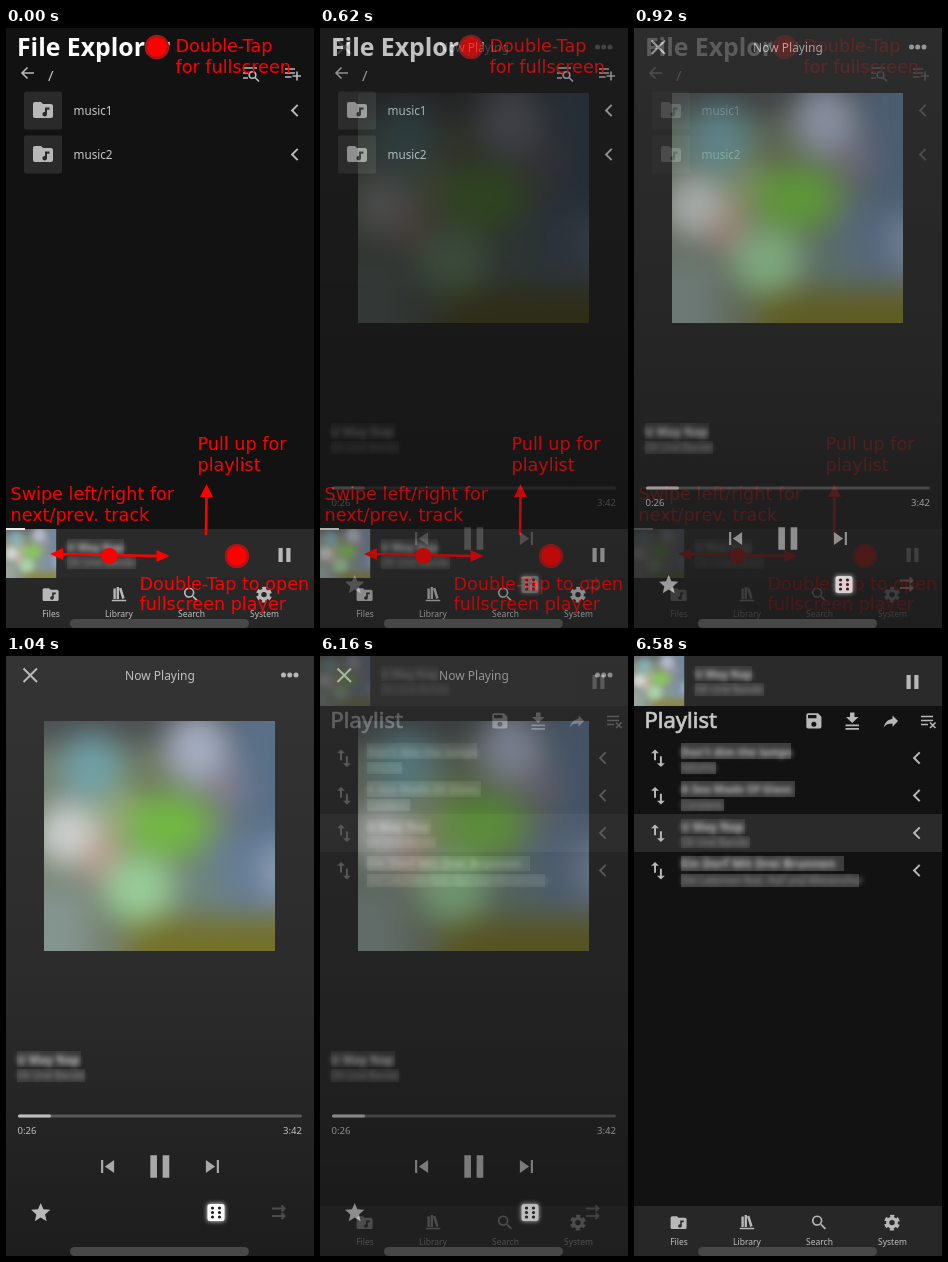
Write an HTML page that moves like this. It is 308 px wide and 600 px high and loops after 8000 ms.

```html
<!DOCTYPE html>
<html lang="en">
<head>
<meta charset="utf-8">
<title>Music player gestures</title>
<style>
  html, body { margin: 0; width: 100%; height: 100%; overflow: hidden; background: #121212; }
  svg { display: block; width: 100%; height: 100%; }
  text { font-family: "Noto Sans", "Open Sans", sans-serif; }
  .icon { fill: #b8b8b8; fill-rule: evenodd; }
  .line { fill: none; stroke: #b8b8b8; stroke-width: 2; }
  .nav text { font-size: 8.5px; fill: #c0c0c0; text-anchor: middle; }
  .time { font-size: 9.6px; fill: #c0c0c0; }
  .soft text { filter: blur(2.6px); }
  .soft .name { font-size: 12px; font-weight: bold; fill: #c0c0c0; }
  .soft .artist { font-size: 10px; fill: #a0a0a0; }
  .soft rect { fill: #fff; opacity: .08; }
  .soft.strong rect { opacity: .18; }
  .hint text { font: 17.6px "DejaVu Sans", sans-serif; fill: #f00; }
  .hint .tap { fill: #f00; stroke: #a81616; stroke-width: 2.5; }
  .hint .arm { fill: none; stroke: #f00; stroke-width: 2.6; }
  .hint .head, .hint .dot { fill: #f00; }

  /* Both fades advance in ten steps of 60 ms, the first one landing at once. */
  #player { animation: showPlayer 8s infinite; }
  #playlist { animation: showPlaylist 8s infinite; }
  @keyframes showPlayer {
    0%, 6.25% { opacity: 0; animation-timing-function: steps(10, start); }
    13.75%, 100% { opacity: 1; }
  }
  @keyframes showPlaylist {
    0%, 75.5% { opacity: 0; animation-timing-function: steps(10, start); }
    83%, 100% { opacity: 1; }
  }
</style>
</head>
<body>
<svg viewBox="0 0 308 600" preserveAspectRatio="none">
  <defs>
    <linearGradient id="shade" x2="0" y2="1">
      <stop offset="0" stop-color="#343434"/>
      <stop offset=".55" stop-color="#2b2b2b"/>
      <stop offset="1" stop-color="#1d1d1d"/>
    </linearGradient>
    <clipPath id="square"><rect width="231" height="230"/></clipPath>
    <filter id="melt" filterUnits="userSpaceOnUse" x="-60" y="-60" width="350" height="350" color-interpolation-filters="sRGB">
      <feGaussianBlur stdDeviation="15"/>
    </filter>
    <filter id="glow" x="-50%" y="-50%" width="200%" height="200%"><feGaussianBlur stdDeviation="2.2"/></filter>

    <g id="cover" clip-path="url(#square)">
      <rect width="231" height="230" fill="#75806f"/>
      <g filter="url(#melt)">
        <rect x="-50" y="-50" width="330" height="75" fill="#4c5052"/>
        <rect x="190" y="-50" width="90" height="180" fill="#5a7088"/>
        <rect x="165" y="115" width="115" height="75" fill="#667b96"/>
        <rect x="85" y="198" width="200" height="90" fill="#747029"/>
        <rect x="-50" y="165" width="95" height="110" fill="#84948f"/>
        <ellipse cx="100" cy="62" rx="26" ry="28" fill="#6f7a5c"/>
        <ellipse cx="48" cy="46" rx="32" ry="34" fill="#70a0a6"/>
        <ellipse cx="153" cy="26" rx="32" ry="36" fill="#a5adc2"/>
        <ellipse cx="185" cy="66" rx="20" ry="17" fill="#857b92"/>
        <ellipse cx="78" cy="98" rx="26" ry="30" fill="#98a678"/>
        <ellipse cx="24" cy="113" rx="32" ry="32" fill="#cdd1cf"/>
        <ellipse cx="57" cy="138" rx="16" ry="24" fill="#c29a90"/>
        <ellipse cx="126" cy="105" rx="42" ry="31" fill="#71b842"/>
        <ellipse cx="95" cy="168" rx="36" ry="34" fill="#98cc98"/>
        <ellipse cx="160" cy="165" rx="24" ry="28" fill="#6c8480"/>
        <ellipse cx="236" cy="150" rx="16" ry="30" fill="#93a4b8"/>
      </g>
    </g>

    <g id="folder" class="icon">
      <path d="M10 4H4c-1.1 0-2 .9-2 2v12c0 1.1.9 2 2 2h16c1.1 0 2-.9 2-2V8c0-1.1-.9-2-2-2h-8z"/>
      <path fill="#2a2a2a" d="M14 9.5h4.5v2.2H16v4.6a2.3 2.3 0 1 1-2-2.3z"/>
    </g>
    <path id="books" class="icon" d="M9 3v15h3V3zM12 5l4 13 3-1-4-13zM5 5v13h3V5zM3 19v2h18v-2z"/>
    <path id="search" class="icon" d="M9.5 3A6.5 6.5 0 0 1 16 9.5c0 1.6-.6 3.1-1.6 4.2l.3.3h.8l5 5-1.5 1.5-5-5v-.8l-.3-.3A6.5 6.5 0 1 1 9.5 3m0 2a4.5 4.5 0 1 0 0 9 4.5 4.5 0 0 0 0-9z"/>
    <g id="cog" class="line">
      <circle cx="12" cy="12" r="5.4" style="stroke-width:4"/>
      <circle cx="12" cy="12" r="8.2" style="stroke-width:3.4" stroke-dasharray="4.9 3.69" stroke-dashoffset="2.45" transform="rotate(30 12 12)"/>
    </g>
    <path id="chevron" class="line" d="M3.2-5.6-2.4 0 3.2 5.6"/>
    <path id="swap" class="icon" d="M16 17V10h-2v7h-3l4 4 4-4zM9 3 5 7h3v7h2V7h3z"/>
    <path id="skip" d="M6 6h2v12H6zM9.5 12l8.5 6V6z"/>
    <path id="pause" d="M-6-7h4.2V7H-6zM1.8-7H6V7H1.8z"/>

    <g id="folderRow">
      <rect x="18" y="-19" width="38" height="38" rx="2" fill="#2a2a2a"/>
      <use href="#folder" transform="translate(25 -12.5)"/>
      <use href="#chevron" x="288.5"/>
    </g>
    <g id="playlistRow">
      <use href="#swap" transform="translate(12.2 -11.5) scale(.98)"/>
      <use href="#chevron" x="282.5"/>
    </g>
    <g id="nowBar">
      <rect width="308" height="50" fill="#2a2a2a"/>
      <use href="#cover" transform="scale(.2175)"/>
      <rect width="50" height="50" fill="#fff" opacity=".16"/>
      <g class="soft">
        <rect x="61" y="10" width="57" height="15"/><rect x="61" y="27" width="69" height="13"/>
        <text class="name" x="61" y="22" style="font-size:10.5px">U May Nap</text>
        <text class="artist" x="61" y="37">Oli Und Bande</text>
      </g>
      <use href="#pause" class="icon" x="278.5" y="26"/>
    </g>
    <rect id="handle" x="64" y="591" width="179" height="9" rx="4.5" fill="#484848"/>
    <g id="navBar" class="nav">
      <rect y="550" width="308" height="50" fill="#272727"/>
      <use href="#folder" transform="translate(35 557) scale(.8)"/>
      <use href="#books" transform="translate(103.4 556.5) scale(.8)"/>
      <use href="#search" transform="translate(175.6 557) scale(.8)"/>
      <use href="#cog" transform="translate(248.4 557) scale(.8)"/>
      <text x="45" y="588.5">Files</text>
      <text x="113" y="588.5">Library</text>
      <text x="185.5" y="588.5">Search</text>
      <text x="258.5" y="588.5">System</text>
      <use href="#handle"/>
    </g>
  </defs>

  <g id="explorer">
    <rect width="308" height="600" fill="#121212"/>
    <text x="11" y="28" font-size="24.8" font-weight="bold" fill="#fff">File Explorer</text>
    <path class="line" style="stroke-width:1.6" d="M28 45H16M21.5 39.5 16 45l5.5 5.5"/>
    <text x="42" y="52.5" font-size="15" fill="#c4c4c4">/</text>
    <g class="line" style="stroke-width:1.6">
      <path d="M237 40h14M237 45h5M237 50h5"/>
      <circle cx="246.5" cy="47" r="3.3"/>
      <path d="m249 49.5 4 4"/>
      <path d="M279 41h10M279 45h10M279 49h6.5M291 43.5v9M286.5 48h8.5"/>
    </g>
    <use href="#folderRow" y="82.5"/>
    <use href="#folderRow" y="126.5"/>
    <g font-size="11.7" fill="#c8c8c8">
      <text x="67.5" y="87">music1</text>
      <text x="67.5" y="131">music2</text>
    </g>
    <use href="#nowBar" y="501"/>
    <use href="#navBar"/>
    <rect y="500" width="19" height="2" fill="#eee"/>

    <g class="hint">
      <circle class="tap" cx="151" cy="19" r="11"/>
      <circle class="tap" cx="231" cy="528" r="11"/>
      <circle class="dot" cx="103.5" cy="528" r="8"/>
      <path class="arm" d="M55 526l97 2M200 507l.5-40"/>
      <path class="head" d="M44 526l13-6v12zM163.5 528l-13-6v12zM200.5 456l6.500 13h-13z"/>
      <text x="169.5" y="24">Double-Tap</text>
      <text x="169.5" y="45">for fullscreen</text>
      <text x="191.5" y="422">Pull up for</text>
      <text x="191.5" y="443">playlist</text>
      <text x="4.5" y="472">Swipe left/right for</text>
      <text x="4.5" y="493">next/prev. track</text>
      <text x="133.5" y="561.5">Double-Tap to open</text>
      <text x="133.5" y="582">fullscreen player</text>
    </g>
  </g>

  <g id="player">
    <rect width="308" height="600" fill="url(#shade)"/>
    <path class="line" d="m17.5 12.5 13.5 13.5m0-13.5L17.5 26"/>
    <text x="154" y="23.5" font-size="12" fill="#c0c0c0" text-anchor="middle">Now Playing</text>
    <g class="icon">
      <circle cx="277.5" cy="19" r="2.5"/><circle cx="283.7" cy="19" r="2.5"/><circle cx="290" cy="19" r="2.5"/>
    </g>
    <use href="#cover" x="38" y="65"/>
    <g class="soft">
      <rect x="11" y="395" width="64" height="16"/><rect x="11" y="413" width="68" height="13"/>
      <text class="name" x="11" y="407.5" style="font-size:11.5px">U May Nap</text>
      <text class="artist" x="11" y="423">Oli Und Bande</text>
    </g>
    <rect x="12" y="458.5" width="284" height="3" rx="1.5" fill="#585858"/>
    <rect x="12" y="458.5" width="33" height="3" rx="1.5" fill="#bcbcbc"/>
    <text class="time" x="11.5" y="478">0:26</text>
    <text class="time" x="296" y="478" text-anchor="end">3:42</text>
    <g fill="#a8a8a8">
      <use href="#skip" transform="translate(88.5 497.5) scale(1.09)"/>
      <use href="#skip" transform="translate(219.5 497.5) scale(-1.09 1.09)"/>
      <use href="#pause" transform="translate(153.8 510.5) scale(1.58 1.6)"/>
    </g>
    <path class="icon" transform="translate(23.2 545) scale(.96)" d="M12 17.27 18.18 21 16.54 13.97 22 9.24 14.81 8.62 12 2 9.19 8.62 2 9.24 7.45 13.97 5.82 21z"/>
    <rect x="201" y="547.5" width="18" height="18" rx="3" fill="#fff" opacity=".8" filter="url(#glow)"/>
    <rect x="201.5" y="548" width="17" height="17" rx="2.5" fill="#fff"/>
    <path d="M206.5 552v9.500M213.5 552v9.500" stroke="#222" stroke-width="3.2" stroke-linecap="round" stroke-dasharray="0 4.5"/>
    <path class="line" style="stroke:#4c4c4c" d="M266 552.5h12M266 560h12M275.5 549.5l3 3-3 3M275.5 557l3 3-3 3"/>
    <use href="#handle"/>
  </g>

  <g id="playlist">
    <rect width="308" height="600" fill="#121212"/>
    <use href="#nowBar"/>
    <text x="10.5" y="72" font-size="22" fill="#c8c8c8" stroke="#c8c8c8" stroke-width=".7">Playlist</text>
    <path class="icon" transform="translate(169.8 54.8) scale(.84)" d="M17 3H5a2 2 0 0 0-2 2v14a2 2 0 0 0 2 2h14a2 2 0 0 0 2-2V7zM12 19a3 3 0 1 1 0-6 3 3 0 0 1 0 6zM15 9H5V5h10z"/>
    <path class="icon" d="M216 56.5h4.5v4.5h4l-6.3 6-6.2-6h4zM211.5 68.5H225V70.2H211.5zM211.5 72H225v1.7H211.5z"/>
    <path class="icon" transform="translate(247.3 55.5) scale(.8)" d="M14 9V5l7 7-7 7v-4.1c-5 0-8.5 1.6-11 5.1 1-5 4-10 11-11z"/>
    <path class="line" style="stroke-width:1.6" d="M287 60.5h12M287 64.5h12M287 68.5h7M296 66.5l5.5 5.5M301.5 66.5 296 72"/>
    <rect y="158" width="308" height="38" fill="#2a2a2a"/>
    <use href="#playlistRow" y="102"/>
    <use href="#playlistRow" y="139.5"/>
    <use href="#playlistRow" y="177"/>
    <use href="#playlistRow" y="214.5"/>
    <g class="soft strong">
      <rect x="47" y="87" width="110" height="16"/><rect x="47" y="106" width="35" height="12"/>
      <rect x="47" y="125" width="114" height="16"/><rect x="47" y="143" width="43" height="12"/>
      <rect x="47" y="200" width="163" height="15"/><rect x="47" y="218" width="178" height="13"/>
      <text class="name" x="47" y="99.5" style="font-size:11px">Don't dim the lamps</text>
      <text class="artist" x="47" y="115">Velumo</text>
      <text class="name" x="47" y="137" style="font-size:11px">A Sea Made Of Glass</text>
      <text class="artist" x="47" y="152.5">Coralane</text>
      <text class="name" x="47" y="212">Ein Dorf Mit Drei Brunnen</text>
      <text class="artist" x="47" y="228">Die Laternen feat. Hof und Wiesenchor</text>
    </g>
    <g class="soft">
      <rect x="47" y="163" width="64" height="15"/><rect x="47" y="180" width="69" height="12"/>
      <text class="name" x="47" y="174.5" style="font-size:11.5px">U May Nap</text>
      <text class="artist" x="47" y="190">Oli Und Bande</text>
    </g>
    <use href="#navBar"/>
  </g>
</svg>
</body>
</html>
```
